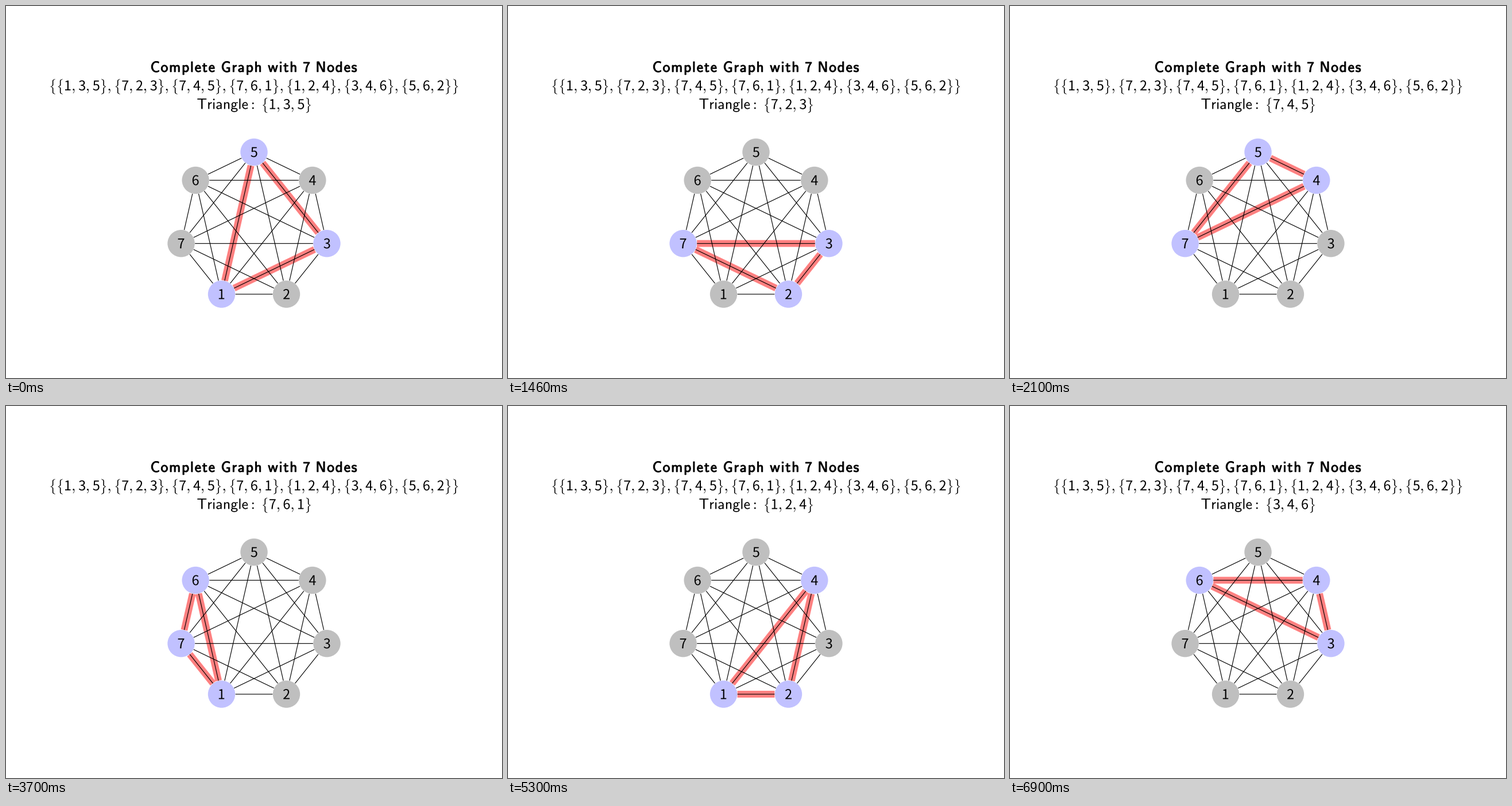
Write a matplotlib script that moves like this. It is 864 px wide and 648 px high and loops after 8 s.

```python
from itertools import combinations

import numpy as np
import matplotlib.pyplot as plt
from matplotlib.animation import FuncAnimation
from matplotlib.patches import Circle, PathPatch
from matplotlib.path import Path
from matplotlib.textpath import TextPath
from matplotlib.transforms import Affine2D

plt.rcParams["mathtext.fontset"] = "cm"

W, H, DPI = 864, 648, 100
PX = 72 / DPI            # points per pixel
STEP = 100               # ms per frame
FRAMES = 80
HOLD, LEAD = 1600, 1100  # time per triangle, time already spent on the first

CENTER = np.array([W / 2, H - 384.7])
RADIUS, NODE_R, GAP = 130.2, 23.7, 24.1
SIZE, BOLD_SIZE = 26.08, 25.5
GRAY, BLUE, RED = "#bfbfbf", "#c1c1ff", "#ff8080"

TRIPLES = [(1, 3, 5), (7, 2, 3), (7, 4, 5), (7, 6, 1),
           (1, 2, 4), (3, 4, 6), (5, 6, 2)]

fig = plt.figure(figsize=(W / DPI, H / DPI), dpi=DPI, facecolor="white")
ax = fig.add_axes([0, 0, 1, 1])
ax.set_xlim(0, W)
ax.set_ylim(0, H)
ax.axis("off")


def move(path, dx, dy=0):
    return Affine2D().translate(dx, dy).transform_path(path)


def centered(path, x, dy=0):
    box = path.get_extents()
    return move(path, x - (box.x0 + box.x1) / 2, dy)


def sans(text, size=SIZE, track=0.0):
    gap = r"\hspace{%.3f}" % track if track else ""
    return TextPath((0, 0), r"$\mathsf{" + gap.join(text) + "}$", size=size)


def digit(char, size=SIZE):
    return TextPath((0, 0), char, size=0.9 * size,
                    prop={"family": "Noto Sans CJK JP"})


def brace(char):
    """Text-size brace, centred on the math axis."""
    path = TextPath((0, 0), "$\\" + char + "$", size=0.845 * SIZE)
    box = path.get_extents()
    return move(path, 0, 0.25 * SIZE - (box.y0 + box.y1) / 2)


def formula(text):
    """Set notation: half-em cells, commas followed by a thin space."""
    parts, x = [], 0
    for char in text:
        width = 0.278 if char == "," else 0.5
        if char in "{}":
            glyph = brace(char)
        elif char == ",":
            glyph = TextPath((0, 0), "$,$", size=SIZE)
        else:
            glyph = digit(char)
        parts.append(centered(glyph, (x + width / 2) * SIZE))
        x += width + (0.167 if char == "," else 0)
    return Path.make_compound_path(*parts)


def row(paths, gap):
    """Join paths side by side with a fixed gap between their inks."""
    parts, x = [], 0
    for path in paths:
        box = path.get_extents()
        parts.append(move(path, x - box.x0))
        x += box.width + gap
    return Path.make_compound_path(*parts)


def add_text(path, stroke=0.0):
    patch = PathPatch(path, facecolor="black", zorder=5, lw=stroke * PX,
                      edgecolor="black" if stroke else "none")
    return ax.add_patch(patch)


def braced(items):
    return "{" + ",".join(map(str, items)) + "}"


def node_pos(n):
    a = np.pi / 2 + (n - 5) * 2 * np.pi / 7
    return CENTER + RADIUS * np.array([np.cos(a), np.sin(a)])


def edge(a, b):
    """Segment between two nodes, stopping at their rims."""
    p, q = node_pos(a), node_pos(b)
    d = (q - p) / np.hypot(*(q - p)) * GAP
    return np.array([p + d, q - d]).T


def add_edge(a, b, color, width, z):
    return ax.plot(*edge(a, b), color=color, lw=width * PX, zorder=z,
                   solid_capstyle="butt", snap=False)[0]


# Heading
title = [digit(word, BOLD_SIZE) if word.isdigit() else sans(word, BOLD_SIZE, 0.077)
         for word in "Complete Graph with 7 Nodes".split()]
add_text(centered(row(title, 13), W / 2, H - 114.8), stroke=1.0)
family = formula(braced(braced(t) for t in TRIPLES))
add_text(centered(family, W / 2 + 0.4, H - 147))
label = sans("Triangle:")
captions = [centered(row([label, formula(braced(t))], 0.6 * SIZE), W / 2, H - 179.5)
            for t in TRIPLES]
caption = add_text(captions[0])

# Graph
for a, b in combinations(range(1, 8), 2):
    add_edge(a, b, "black", 1.15, 2)
bands = [add_edge(a, b, RED, 11.9, 1) for a, b in combinations(TRIPLES[0], 2)]
nodes = {}
for n in range(1, 8):
    x, y = node_pos(n)
    nodes[n] = ax.add_patch(Circle((x, y), NODE_R, fc=GRAY, ec="none", zorder=3))
    add_text(centered(digit(str(n)), x, y - 8.5))


def update(frame):
    i = (frame * STEP + LEAD) // HOLD
    triple = TRIPLES[i]
    caption.set_path(captions[i])
    for band, (a, b) in zip(bands, combinations(triple, 2)):
        band.set_data(*edge(a, b))
    for n, disc in nodes.items():
        disc.set_facecolor(BLUE if n in triple else GRAY)
    return [caption, *bands, *nodes.values()]


anim = FuncAnimation(fig, update, frames=FRAMES, interval=STEP,
                     repeat=True, repeat_delay=0, blit=False)
plt.show()
```
